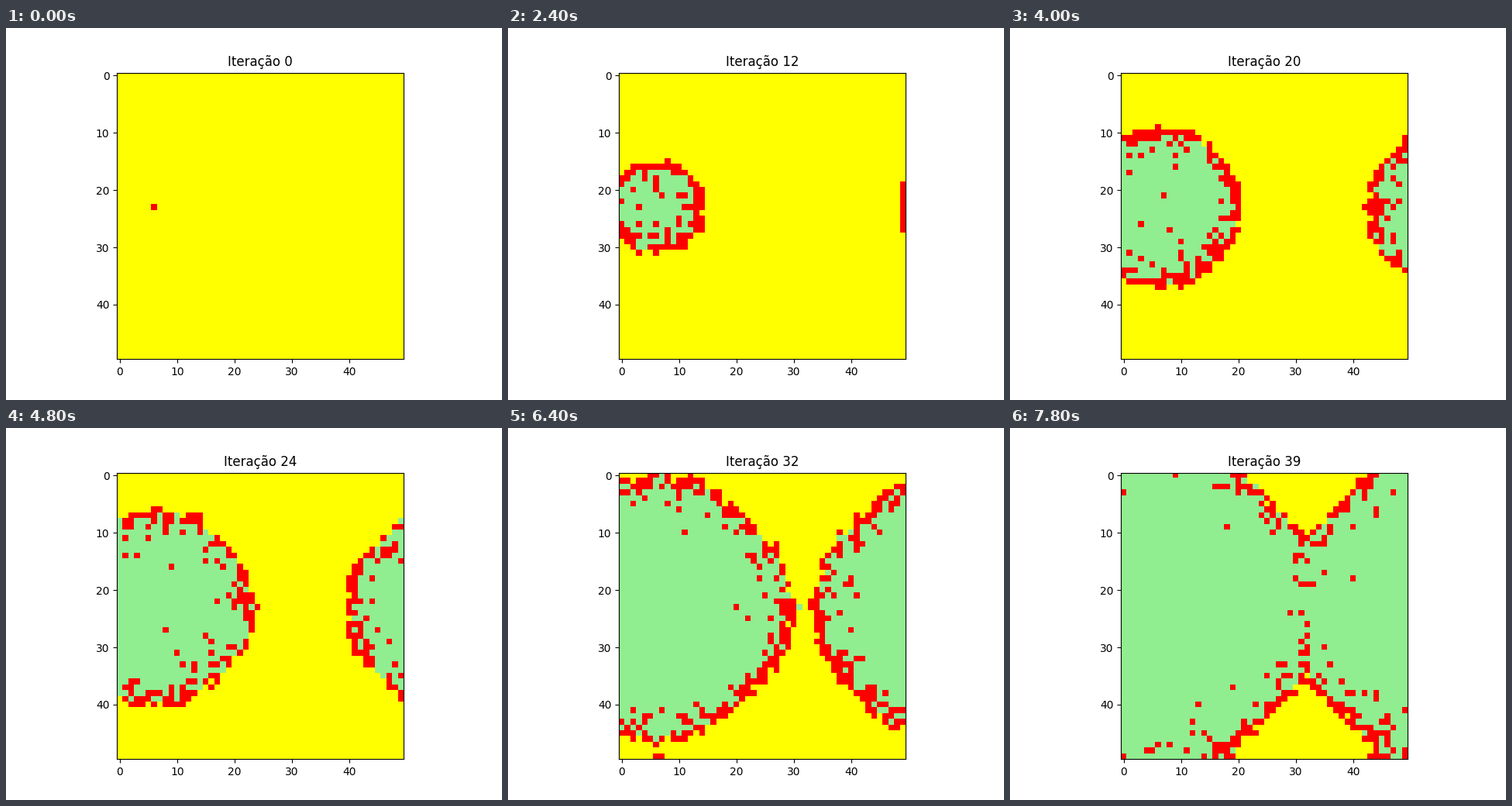
Recreate the animation shown at these times as a matplotlib script. Size 640 by 480 pixels, loop 8 s.

```python
import numpy as np
import matplotlib.pyplot as plt
from matplotlib.animation import FuncAnimation
from matplotlib.colors import ListedColormap

SIZE = 50
STEPS = 40
START_X, START_Y = 6, 23
HEAL = 0.34
ROUGHNESS = 0.02
rng = np.random.default_rng(12)


def reach(angle, t):
    """City-block radius of the spread: fast on diagonals, late on the axes."""
    speed = 0.965 + 0.025 * np.cos(angle - 0.3)
    axis_lag = 0.9 * t ** 0.57 * np.cos(2 * angle) ** 4
    return speed * t - axis_lag


def infection_times():
    """First iteration at which the spread covers each cell of the torus."""
    rows, cols = np.mgrid[:SIZE, :SIZE]
    rough = 1 + ROUGHNESS * rng.standard_normal((SIZE, SIZE))
    first = np.full((SIZE, SIZE), STEPS)
    for shift_x in (-SIZE, 0, SIZE):
        for shift_y in (-SIZE, 0, SIZE):
            dx = cols - START_X + shift_x
            dy = rows - START_Y + shift_y
            dist = abs(dx) + abs(dy)
            # Angle measured evenly along the sides of the diamond
            lean = dx / np.maximum(dist, 1)
            angle = np.pi / 2 * np.where(dy >= 0, 1 - lean, 3 + lean)
            for t in range(STEPS):
                hit = dist * rough <= reach(angle, t)
                first[hit | (dist == 0)] = np.minimum(
                    first[hit | (dist == 0)], t)
    return first


infected = infection_times()
healed = infected + rng.geometric(HEAL, infected.shape)


def state(t):
    """0 healthy, 1 infected, 2 recovered."""
    return (infected <= t).astype(int) + (healed <= t)


fig, ax = plt.subplots(figsize=(6.4, 4.8), dpi=100)
cmap = ListedColormap(["yellow", "red", "lightgreen"])
image = ax.imshow(state(0), cmap=cmap, vmin=0, vmax=2,
                  interpolation="nearest")
title = ax.set_title("Iteração 0")


def update(t):
    image.set_data(state(t))
    title.set_text(f"Iteração {t}")
    return image, title


anim = FuncAnimation(fig, update, frames=STEPS, interval=200,
                     repeat=True, repeat_delay=0)
plt.show()
```
